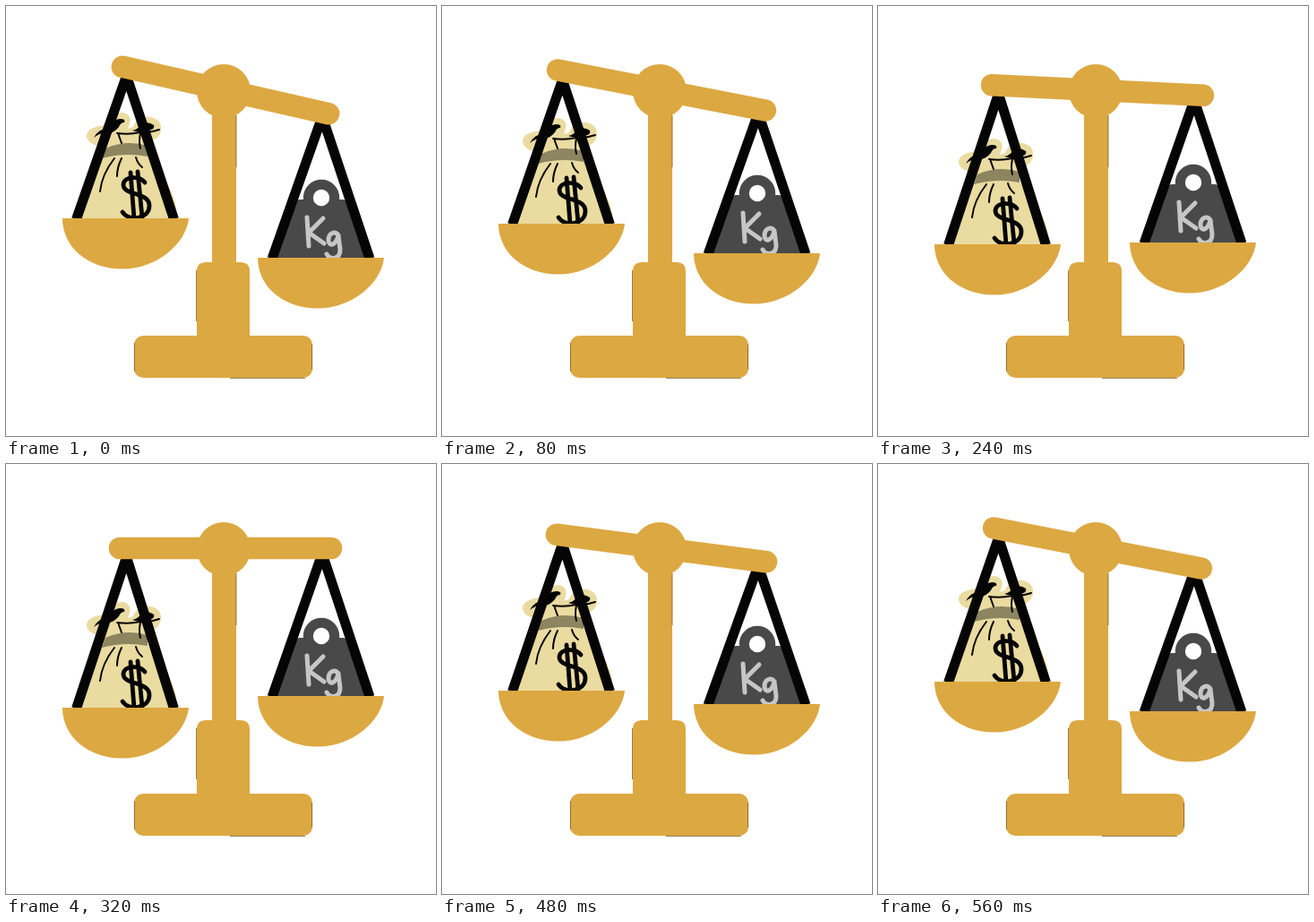
Write an HTML page that moves like this. It is 480x480 px and loops after 640 ms.

```html
<!DOCTYPE html>
<html lang="en">
<head>
<meta charset="utf-8">
<title>Balance scale</title>
<style>
  html, body { margin: 0; height: 100%; overflow: hidden; background: #fff; }
  svg { display: block; width: 100vw; height: 100vh; }
  .gold { fill: #dca841; }
  .ink { fill: none; stroke: #050505; stroke-linecap: round; stroke-linejoin: round; }
  .edge { fill: none; stroke: #7a5d24; stroke-width: 0.8; }
  .rope { fill: none; stroke: #050505; stroke-width: 11; stroke-miterlimit: 9; }
  .chalk { fill: none; stroke: #c6c6c6; stroke-width: 5; stroke-linecap: round; stroke-linejoin: round; }
</style>
</head>
<body>
<svg viewBox="0 0 480 480">
  <defs>
    <!-- Bowl with its rim on y = 0 -->
    <path id="bowl" class="gold" d="M63 0H204C201 28 169 56.5 130 56.5C91 56.5 63 32 63 0Z"/>
  </defs>

  <!-- Money bag, standing on y = 0 -->
  <g id="bag">
    <g transform="translate(0 -237)">
      <path fill="#eadba0" d="M108 156C98 157 90 151 90 145C90 137 100 134 111 133C115 124 122 119 130 119C137 120 140 125 138 131L136 137L142 135C144 128 153 123 161 124C169 125 174 131 173 138C172 147 165 151 156 151L158 167C172 183 184 203 189 220Q191 229 190 238H81C84 211 97 188 109 166Z"/>
      <path fill="#8d8560" d="M111 159Q134 149 158 156V168Q133 163 107 170Z"/>
      <path d="M98 147Q104 136 114 137Q118 127 127 126Q134 126 132 130Q128 130 126 135Q121 141 115 142Q105 141 98 147ZM141 139Q147 138 151 132Q158 128 165 133Q167 138 158 139Q149 142 141 139Z"/>
      <path class="ink" stroke-width="2" d="M124 142Q137 144 150 141Q160 142 171 138M125 142L129 153M150 142Q148 151 150 159M121 170Q107 188 105 207M129 170Q124 180 124 190M145 169Q147 176 152 180"/>
      <path class="ink" stroke-width="4.8" d="M155 197C149 189 132 190 131 199C130 212 160 207 160 223C160 238 137 241 130 230M139 186L143 237M147 185L152 236"/>
    </g>
  </g>

  <!-- Iron weight, standing on y = 0 -->
  <g id="weight">
    <g transform="translate(0 -281)">
      <path fill="#494949" d="M328 216H376Q379 216 380 219L402 282H302L324 219Q325 216 328 216Z"/>
      <circle cx="352" cy="214" r="14.7" fill="#fff" stroke="#494949" stroke-width="11"/>
      <path class="chalk" d="M336 236L338 268M354 237L338 253L355 265M371 256C367 250 360 254 360 261C360 269 368 268 371 256L373 272C373 283 362 284 358 277"/>
    </g>
  </g>

  <path id="leftRope" class="rope"/>
  <path id="rightRope" class="rope"/>
  <use id="leftBowl" href="#bowl"/>
  <use id="rightBowl" href="#bowl"/>

  <line id="beam" x1="-118" x2="118" stroke="#dca841" stroke-width="24.6" stroke-linecap="round"/>
  <g class="gold">
    <circle cx="243" cy="95" r="30"/>
    <rect x="230" y="95" width="27" height="200"/>
    <path d="M213 375V296Q213 286 223 286H262Q272 286 272 296V375Z"/>
    <rect x="143" y="368" width="199" height="47" rx="10"/>
  </g>
  <path class="edge" d="M257 122V180M212.5 295V352M143.4 376V408M250 415.4H334M341.6 378V406"/>
</svg>
<script>
  const STEP = 80;
  // Beam angle, then rope top and bowl rim heights on each side
  const poses = [
    { angle: 12.8, left: [78, 237], right: [123.5, 281] },
    { angle: 11, left: [82.5, 243], right: [119.5, 276] },
    { angle: 7.4, left: [89, 253], right: [113.5, 268] },
    { angle: 2.8, left: [98, 266], right: [105, 264] },
    { angle: 0, left: [104, 272], right: [100, 259] }
  ];

  const move = (id, transform) =>
    document.getElementById(id).setAttribute("transform", transform);

  function hang(side, load, [top, rim], apexX, bowlX) {
    document.getElementById(side + "Rope").setAttribute("d",
      `M${apexX - 56} ${rim + 1}L${apexX} ${top}L${apexX + 53} ${rim + 1}`);
    move(side + "Bowl", `translate(${bowlX} ${rim})`);
    move(load, `translate(0 ${rim})`);
  }

  function draw(now) {
    const step = Math.floor(now / STEP) % 8;
    const pose = poses[Math.min(step, 8 - step)];
    move("beam", `translate(245 94) rotate(${pose.angle})`);
    hang("left", "bag", pose.left, 134.5, 0);
    hang("right", "weight", pose.right, 353, 218);
  }

  const start = performance.now();
  function tick() {
    draw(performance.now() - start);
    requestAnimationFrame(tick);
  }
  tick();
</script>
</body>
</html>
```
